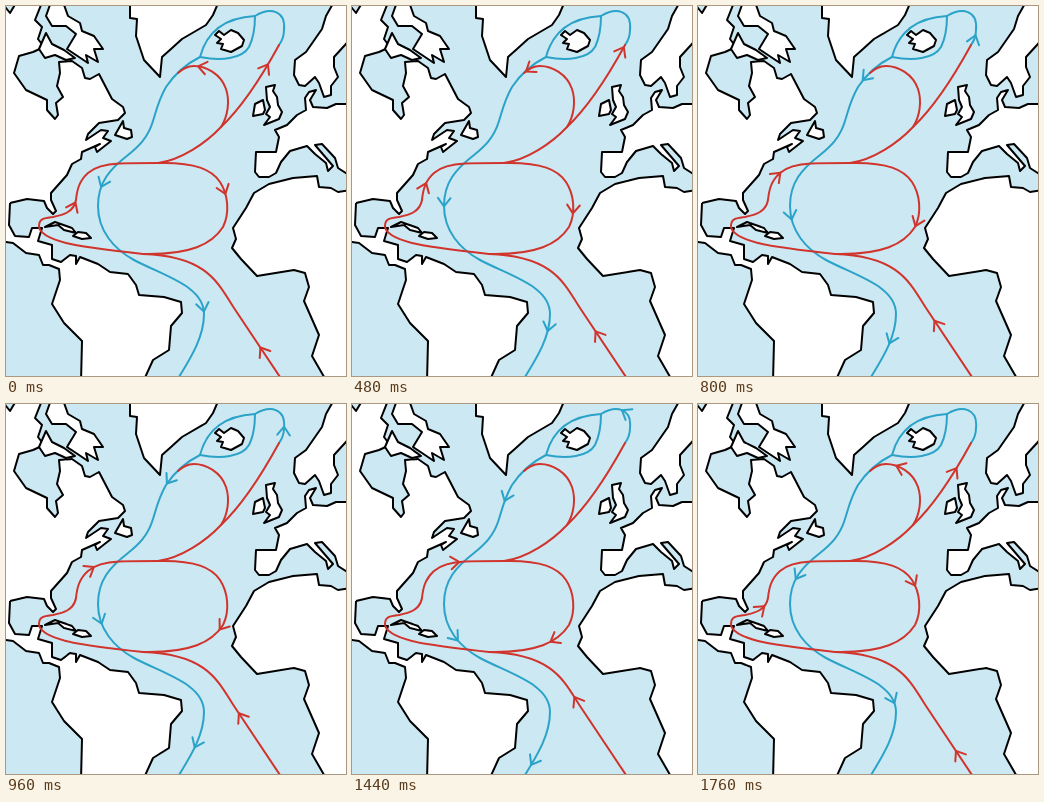
These frames come from a looping animation (340 px wide and 370 px high, 1.92 s). An HTML page:

```html
<!DOCTYPE html>
<html lang="en">
<head>
<meta charset="utf-8">
<title>Ocean currents</title>
<style>
  html, body { margin: 0; width: 100%; height: 100%; overflow: hidden; background: #cce8f2; }
  svg { display: block; width: 100vw; height: 100vh; }
  #land path { fill: #fff; stroke: #000; stroke-width: 2; stroke-linejoin: round; }
  #currents path, #arrows path { fill: none; stroke-width: 2; stroke-linejoin: round; stroke-linecap: round; }
</style>
</head>
<body>
<svg id="map" viewBox="0 0 340 370">
  <g id="land"></g>
  <g id="currents"></g>
  <g id="arrows"></g>
</svg>
<script>
const RED = "#d0342c", BLUE = "#2ba3c9";
const STEP = 160, STEPS = 12, FIRST = 2;
const WING = 10.5, SPREAD = 37 * Math.PI / 180;

function add(parent, d, color) {
  const p = document.createElementNS("http://www.w3.org/2000/svg", "path");
  p.setAttribute("d", d);
  if (color) p.setAttribute("stroke", color);
  document.getElementById(parent).append(p);
  return p;
}

const land = {
  northAmerica: "M4 197L21 193 38 195 41 202 47 208 50 205 45 194V187L53 178 61 169 66 158 75 153 76 146 " +
    "94 138 89 141 91 146 105 135 97 132 102 125 95 124 80 134 82 128 93 117 112 114 119 107 117 101 " +
    "106 93 93 68 84 73 79 72 76 62 66 55 53 56 54 67 51 80 57 91 50 97 52 109 49 113 41 104V94" +
    "L20 84 8 67 13 50 27 46 38 41 32 33 36 21 29 14 37-6H-6V197",
  southAmerica: "M4 197L3 219 9 230 23 231 26 222H36L32 235 46 239V253L55 256 64 249 70 250V258L74 251 " +
    "92 258 104 266 122 268 130 279 133 289 158 291 175 296 176 307 165 320 163 344 147 354 137 376" +
    "H75L76 335 58 317 46 298 54 274 53 263 43 259 37 259 33 249 20 247 7 237-6 235V197",
  baffin: "M57-4L62 10 74 17 76 25 88 30 97 43H88L92 56 80 49 82 57 61 43 70 28 60 20H46L40 10 45-4Z",
  southampton: "M40 27L46 38 58 44 69 52 60 54 49 49 39 52 33 43Z",
  newfoundland: "M109 129L117 115 118 122 125 124 126 131 121 133Z",
  cuba: "M39 221L49 216 66 222 70 227 58 224 52 219Z",
  hispaniola: "M67 230L72 226 80 227 85 232 76 233Z",
  greenland: "M124-5V12L131 13 130 30 138 54 154 71 156 51 165 43 176 33 200 19 207 9 213-5Z",
  iceland: "M209 29L213 25 218 29 225 24 232 27 238 34 236 40 225 46 215 43 217 38 211 37 215 33Z",
  britain: "M260 81L269 79 267 85 271 91 272 99 276 106 273 113 258 119 264 111 260 108 264 101 261 94Z",
  ireland: "M249 98L257 94 259 104 257 108 247 110Z",
  scandinavia: "M346-6H329L320 10 316 23 300 46 289 54 288 69 293 79 299 80 309 71 313 77 318 91 325 89" +
    "V80L332 71 328 61V51L339 39 346 31Z",
  europe: "M346 98H330L321 102 307 101 304 94 310 84 303 86 299 92 300 104 291 109 281 119 269 124 " +
    "273 131 270 146 250 146 249 166 253 171H263L270 167 275 156 284 145 301 140 309 148 320 157 " +
    "322 165 327 160 309 139 316 138 329 152 332 162 346 171Z",
  africa: "M346 184L332 186 325 182 313 181 311 170 287 172 263 178 248 187 240 202 227 222 230 233 " +
    "226 242 235 253 251 270 288 264 299 267 303 281 298 295 313 329 306 350 321 376H346Z"
};
Object.values(land).forEach(d => add("land", d));
add("land", "M-4-3L4 7 10-3Z").style.fill = "#cce8f2";

const south = "M274 371L228 302C212 277 201 250 137 248";
const gulf = "M137 248C110 245 75 241 60 237C45 233 33 227 33 220C33 212 40 212 47 211" +
  "C57 209 68 206 70 194C71 184 73 175 82 167C90 160 102 158 113 157.5C125 157 138 157 152 157";
const gyre = "M152 157C190 156 206 164 214 176C222 188 224 207 217 221C206 238 185 249 137 248";
const north = "M152 157C175 154 200 137 215 121C235 102 255 72 273 39";
const branch = "M215 121C222 110 224 95 220 83C215 68 200 60 188 60C181 60 177 63 172 67";
const upper = "C152 95 150 106 147 115C142 132 132 141 122 149";
const cold = "M194 51C178 59 166 72 160 81" + upper +
  "C104 163 92 176 92 200C92 225 108 243 128 254C158 270 198 280 198 308C198 330 186 350 173 371";
const ring = "M194 51C199 32 212 12 249 10M194 51C215 55 236 53 243 41C247 33 249 22 249 10";
const cap = "C276 35 278 31 278 24C280 4 264 1 249 10";

[cold, ring, "M273 39" + cap].forEach(d => add("currents", d, BLUE));
[south, gulf, gyre, north, branch].forEach(d => add("currents", d, RED));

// Length along a path closest to a point
function lengthAt(path, [x, y]) {
  let best = 0, gap = Infinity;
  for (let s = 0, end = path.getTotalLength(); s <= end; s += 0.5) {
    const p = path.getPointAtLength(s), g = Math.hypot(p.x - x, p.y - y);
    if (g < gap) { gap = g; best = s; }
  }
  return best;
}

function makeArrow(d, from, to, ...colors) {
  const track = add("arrows", d, "none");
  const a = lengthAt(track, from), b = lengthAt(track, to);
  return { track, a, b, colors, mark: add("arrows", "M0 0", colors[0]) };
}

const arrows = [
  makeArrow(south, [262, 352], [222, 293], RED),
  makeArrow(gulf, [61, 206], [107, 158], RED),
  makeArrow(gyre, [214, 176], [198, 237], RED),
  makeArrow(cold, [102, 170], [105, 237], BLUE),
  makeArrow(cold, [194, 293], [180, 361], BLUE),
  makeArrow(north + cap, [255, 70], [270, 6], RED, BLUE),
  makeArrow(branch + "C166 72 163 76 160 81" + upper, [204, 65], [152, 97], RED, BLUE)
];
// The northern tip lingers for one step after the restart
const linger = makeArrow(north + cap, [270, 6], [270, 6], BLUE);

function place(arrow, step) {
  const { track, a, b, colors, mark } = arrow;
  const s = a + (b - a) * step / (STEPS - 1);
  const tip = track.getPointAtLength(s), tail = track.getPointAtLength(s - 5);
  const back = Math.atan2(tail.y - tip.y, tail.x - tip.x);
  const wing = t => (tip.x + WING * Math.cos(t)).toFixed(2) + " " + (tip.y + WING * Math.sin(t)).toFixed(2);
  mark.setAttribute("d", `M${wing(back - SPREAD)}L${tip.x} ${tip.y}L${wing(back + SPREAD)}`);
  mark.setAttribute("stroke", colors[step < STEPS / 2 ? 0 : colors.length - 1]);
}

function draw(ms) {
  const step = (Math.floor(ms / STEP) + FIRST) % STEPS;
  arrows.forEach(a => place(a, step));
  linger.mark.setAttribute("visibility", step === 0 ? "visible" : "hidden");
}

place(linger, 0);
draw(0);
const start = performance.now();
function tick() {
  draw(Math.max(0, performance.now() - start));
  requestAnimationFrame(tick);
}
requestAnimationFrame(tick);
</script>
</body>
</html>
```
